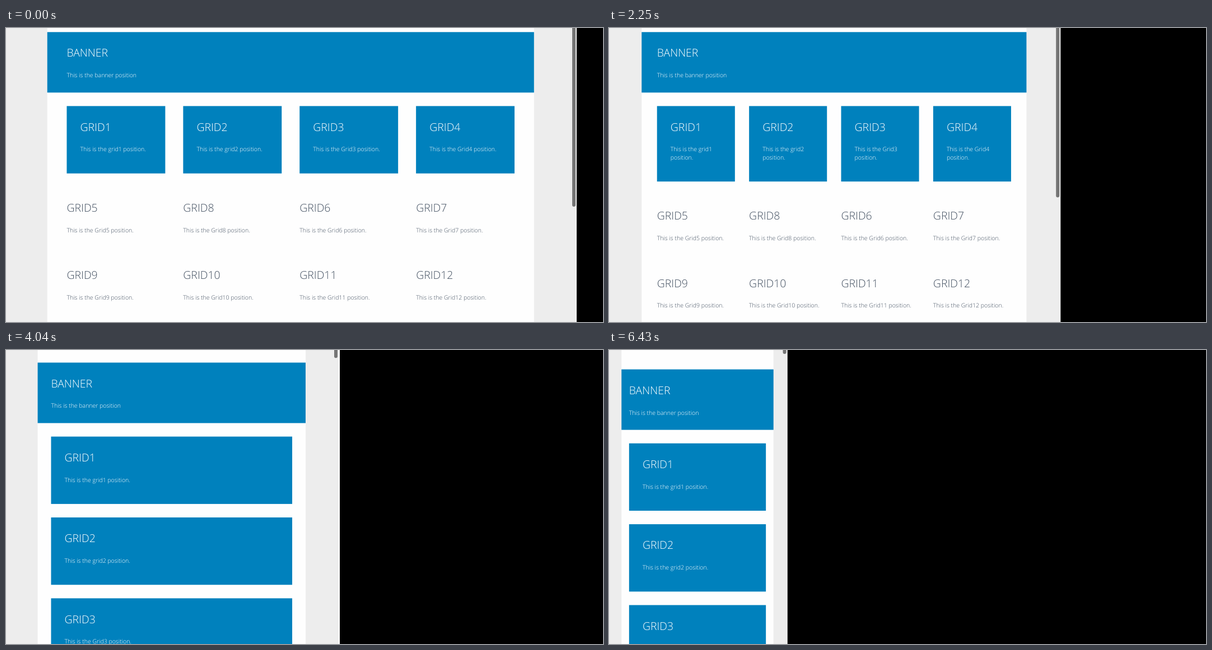
Recreate the animation shown at these times as an HTML page. Size 1066x525 px, loop 8000 ms.

```html
<!DOCTYPE html>
<html lang="en">
<head>
<meta charset="utf-8">
<title>Responsive grid</title>
<style>
  html, body { margin: 0; width: 100%; height: 100%; overflow: hidden; background: #000; }
  svg { display: block; width: 1066px; height: 525px; }
  text { font-family: "Open Sans", sans-serif; font-weight: 300; text-rendering: geometricPrecision; }
  .head { font-size: 19.4px; }
  .body { font-size: 10.5px; }
  .light { fill: #fff; }
  .dark { fill: #435061; }
</style>
</head>
<body>
<svg id="stage" viewBox="0 0 1066 525"></svg>
<script>
const LOOP = 8000, LAST = 43;
const BLUE = '#0081bd', PAD = 24.1, LINE = 14.45, BOX = 120.3, BANNER = 108;

// step, window width, repaint lag, scrollbar thumb end
const KEYS = [
  [0, 1019, 0, 319], [4, 971, 2, 317], [5, 959, 3, 309], [7, 935, 5, 308],
  [12, 850, 0, 304], [14, 821, 0, 303], [19, 747, 0, 301], [21, 708, 1, 300],
  [22, 689, 1, 279], [23, 678, 2, 277], [25, 637, 2, 270], [26, 616.5, 2, 15],
  [29, 555, 2, 13], [32, 507, 2, 11], [36, 422, 1, 9], [43, 318.5, 0, 7]
];
const ROWS = [[1, 2, 3, 4], [5, 8, 6, 7], [9, 10, 11, 12]];
const stage = document.getElementById('stage');

function stepAt(t) {
  if (t >= 6430) return LAST;
  return Math.floor((t >= 2840 ? t + 10 : t) / 150);
}

function valuesAt(step) {
  const i = Math.max(1, KEYS.findIndex(k => k[0] >= step));
  const a = KEYS[i - 1], b = KEYS[i], p = (step - a[0]) / (b[0] - a[0]);
  return a.slice(1).map((v, j) => v + (b[j + 1] - v) * p);
}

const rect = (x, y, w, h, fill, r = 0) =>
  `<rect x="${x}" y="${y}" width="${w}" height="${h}" rx="${r}" fill="${fill}"/>`;
const text = (x, y, cls, s) => `<text x="${x}" y="${y}" class="${cls}">${s}</text>`;

function block(x, y, title, lines, tone) {
  return text(x, y + 44.1, 'head ' + tone, title) +
    lines.map((s, i) => text(x, y + 80.9 + i * LINE, 'body ' + tone, s)).join('');
}

// Break the sentence where the column gets too narrow
function wrap(n, room) {
  const name = (n < 3 ? 'grid' : 'Grid') + n;
  const words = [['This is the', 47.5], [name, n < 3 ? 24 : n > 9 ? 32 : 26], ['position.', 40.5]];
  const lines = [];
  let used = Infinity;
  for (const [word, w] of words) {
    if (used + 2.7 + w > room) {
      lines.push(word);
      used = w;
    } else {
      lines[lines.length - 1] += ' ' + word;
      used += 2.7 + w;
    }
  }
  return lines;
}

function columns(x, y, width) {
  const col = width * 0.22, gap = width * 0.26;
  let out = '';
  ROWS.forEach((row, r) => {
    const boxed = r === 0, pad = boxed ? PAD : 0;
    let tallest = 0;
    row.forEach((n, c) => {
      const left = x + c * gap, lines = wrap(n, col - 2 * pad);
      const h = BOX + (lines.length - 1) * LINE;
      if (boxed) out += rect(left, y, col, h, BLUE);
      out += block(left + pad, y, 'GRID' + n, lines, boxed ? 'light' : 'dark');
      tallest = Math.max(tallest, h);
    });
    y += tallest + pad;
  });
  return out;
}

function stack(x, y, width) {
  return ROWS[0].map((n, i) => {
    const top = y + i * (BOX + PAD);
    return rect(x, top, width, BOX, BLUE) +
      block(x + PAD, top, 'GRID' + n, wrap(n, width - 2 * PAD), 'light');
  }).join('');
}

function draw(step) {
  const [win, lag, thumb] = valuesAt(step);
  const edge = win - lag, view = edge - 2.5;
  const wide = view > 620, small = view < 480;
  const left = view * (wide ? 0.0725 : small ? 0.0705 : 0.0956);
  const width = view - 2 * left;
  const inset = width * (wide ? 0.04 : 0.05);
  const top = wide ? 7.3 : small ? 34.6 : 22.5;
  const x = left + inset, inner = width - 2 * inset, y = top + BANNER + PAD;

  stage.innerHTML =
    rect(0, 0, win, 525, '#fefefe') +
    rect(0, 0, edge, 525, '#ededed') +
    rect(left, 0, width, 525, '#fefefe') +
    rect(left, top, width, BANNER, BLUE) +
    block(x, top, 'BANNER', ['This is the banner position'], 'light') +
    (wide ? columns : stack)(x, y, inner) +
    rect(edge - 8, -20, 6, thumb + 20, '#757575', 3);
}

let shown = -1;
function tick() {
  const step = stepAt(performance.now() % LOOP);
  if (step !== shown) draw(shown = step);
  requestAnimationFrame(tick);
}
tick();
</script>
</body>
</html>
```
